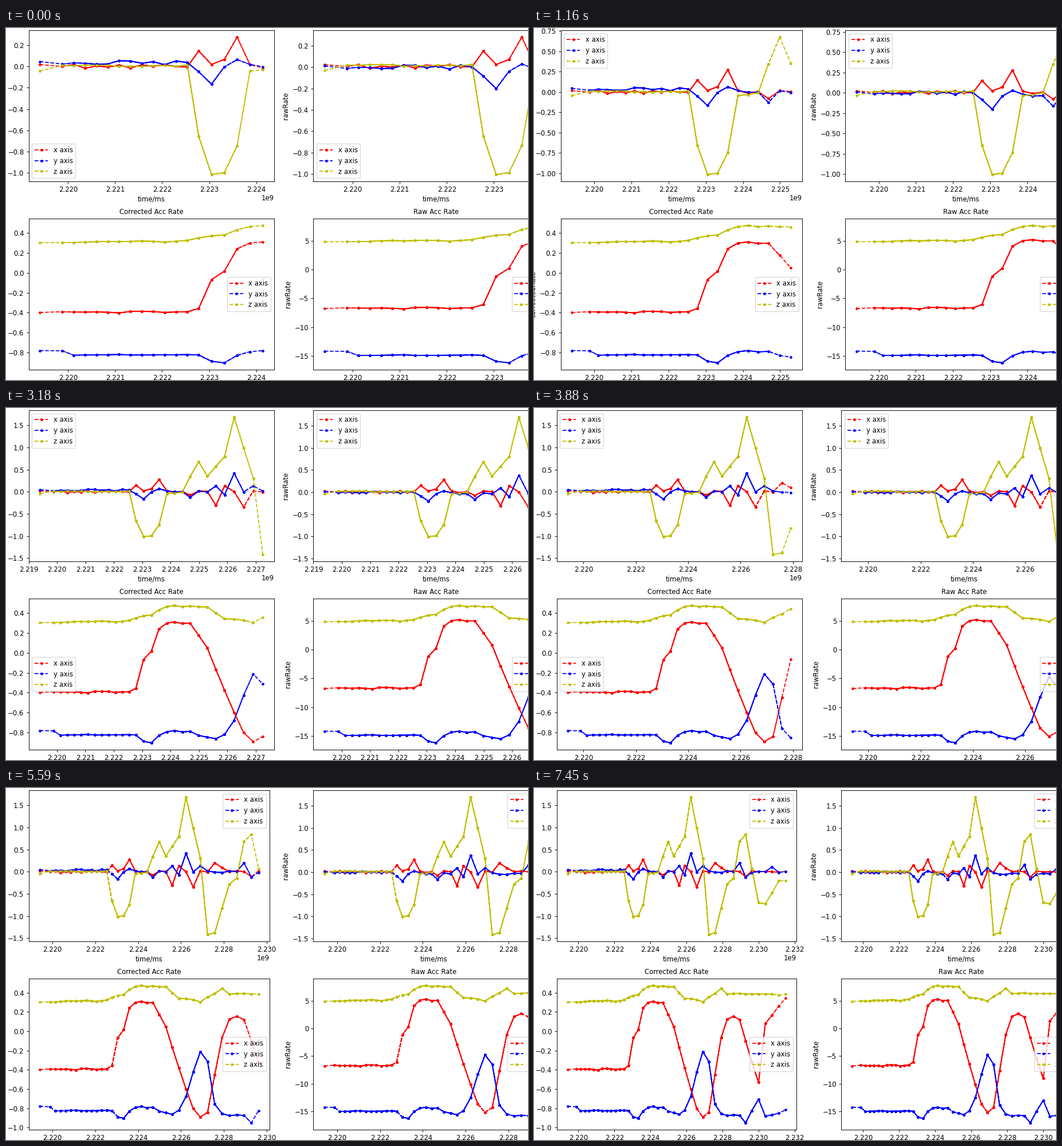
A matplotlib script that plays this animation: 911x615 px, repeating every 7540 ms.

```python
import numpy as np
import matplotlib.pyplot as plt
from matplotlib.animation import FuncAnimation
from matplotlib.artist import Artist

W, H, DPI = 911, 615, 84
LOOP, STEP = 7540, 20
COUNT, START = 41, 19   # all samples, samples on screen when the loop begins
WINDOW = 6              # samples redrawn with every update
AX_W, AX_H = 428, 264
COLORS = "rby"
LABELS = ["x axis", "y axis", "z axis"]
UPDATES = [300, 610, 930, 1160, 1540, 1850, 2230, 2480, 2860, 3180, 3560,
           3880, 4190, 4490, 4890, 5210, 5590, 5990, 6370, 6750, 7070, 7450]

rng = np.random.default_rng(4)
index = np.arange(COUNT)


def noise(size):
    return rng.uniform(-size, size, COUNT)


def curve(*keys):
    """Straight runs between a few (sample, value) points."""
    return np.interp(index, *zip(*keys))


def jolts(base, hits):
    """A steady reading with single sharp knocks."""
    out = base + noise(.02)
    for i, value in hits.items():
        out[i] = value
    return out


# Sample times, in millions of ms after 2.220e9
times = curve((0, -.6), (1, -.122), (13, 2.777), (20, 4.685), (24, 5.9),
              (29, 7.581), (35, 9.63), (40, 11.5))

# Turning rate: the swing is about z, the other axes only shake
spin = curve((0, -.04), (1, .01), (12, .01), (13, -.655), (14, -1.015),
             (15, -1), (16, -.755), (17, -.045), (19, 0), (21, .68),
             (22, .345), (24, .8), (25, 1.68), (27, .31), (28, -1.415),
             (29, -1.38), (31, -.285), (32, -.155), (33, .68), (34, .85),
             (36, -.7), (37, -.735), (39, -.21), (40, -.21))
gyro = [
    jolts(0, {13: .145, 15: .066, 16: .275, 20: -.08, 23: -.312, 24: .135,
              26: -.345, 29: .2, 30: .09, 34: -.115}),
    jolts(np.where(index < 13, .035, 0),
          {13: -.05, 14: -.166, 16: .064, 20: -.128, 23: .13, 24: -.07,
           25: .417, 27: .13, 33: .2, 34: -.12, 38: .11}),
    spin + noise(.012),
]

# Acceleration is gravity seen from the swinging sensor, so y follows x and z
acc_x = noise(.009) + curve(
    (0, -.395), (12, -.395), (13, -.35), (14, -.073), (15, .023), (16, .233),
    (17, .303), (20, .297), (22, .04), (26, -.807), (27, -.888), (28, -.848),
    (30, -.065), (31, .12), (32, .163), (33, .113), (36, -.533), (37, .075),
    (40, .343))
acc_z = noise(.007) + curve(
    (0, .305), (11, .315), (15, .38), (17, .47), (22, .462), (24, .347),
    (27, .31), (30, .437), (31, .39), (40, .378))
acc_y = -np.sqrt(.93 - acc_x ** 2 - acc_z ** 2)
acc_y[:2] += .045
acc_y[[15, 34]] = -.903, -.95
acc = [acc_x, acc_y, acc_z]

raw_gyro = [gyro[0] + .005, gyro[1] - .035, gyro[2] + .01]
raw_acc = [17 * acc_x, 16.6 * acc_y - 1.25, 16.5 * acc_z - .1]

# Row, column, series, title, y label
PANELS = [
    (0, 0, gyro, "Corrected Gyro Rate", "correctedRate"),
    (0, 1, raw_gyro, "Raw Gyro Rate", "rawRate"),
    (1, 0, acc, "Corrected Acc Rate", "correctedRate"),
    (1, 1, raw_acc, "Raw Acc Rate", "rawRate"),
]
fig = plt.figure(figsize=(W / DPI, H / DPI), dpi=DPI, facecolor="white")
axes = []
for row, col, _, title, ylabel in PANELS:
    ax = fig.add_axes([0, 0, 1, 1], label=title)
    ax.set_title(title, fontsize=10, pad=6.5)
    ax.set_xlabel("time/ms", labelpad=2.8)
    ax.set_ylabel(ylabel)
    ax.xaxis.OFFSETTEXTPAD = 1.5
    axes.append(ax)


def padded(low, high):
    pad = .05 * (high - low)
    return low - pad, high + pad


def snapped(limits):
    """Pull each limit onto a tick lying within a pixel of it."""
    near = (limits[1] - limits[0]) / AX_W
    return [round(v) if abs(v - round(v)) < near else v for v in limits]


def layout(n):
    """Left shift and width of the panels, fitted to their tick labels."""
    rates = padded(np.min(gyro[2][:n]), np.max(gyro[2][:n]))
    two_decimals = .2 < (rates[1] - rates[0]) / 9 <= .25
    shift = 7 if two_decimals else 0
    low, high = snapped(padded(times[0], times[n - 1]))
    span = high - low
    step = 1 if span <= 9 else 2
    last_gap = high % step / span * AX_W
    return shift, AX_W - shift - max(0, 13 - last_gap)


def legend_spot(row, col, state):
    if row == 0:
        if state < 2:
            return "lower left"
        return "upper left" if state < 13 else "upper right"
    return "center left" if col == 0 and 5 <= state < 16 else "center right"


def add_window(ax, series, end):
    part = slice(end - WINDOW, end)
    for values, color in zip(series, COLORS):
        ax.plot((2220 + times[part]) * 1e6, values[part], color + ".--")


def render(state):
    n = START + state
    shift, width = layout(n)
    for ax, (row, col, series, *_) in zip(axes, PANELS):
        for end in range(WINDOW if state == 0 else n, n + 1):
            add_window(ax, series, end)
        xlim = padded(times[0], times[n - 1])
        if row == 0:
            xlim = snapped(xlim)
        ax.set_xlim([(2220 + v) * 1e6 for v in xlim])
        seen = np.array(series)[:, :n]
        ax.set_ylim(padded(seen.min(), seen.max()))
        left, bottom = (39.6, 536.4)[col] + shift, (268, 597)[row]
        ax.set_position([left / W, 1 - bottom / H, width / W, AX_H / H])
        ax.legend(ax.lines[:3], LABELS, loc=legend_spot(row, col, state))
    fig.canvas.draw()
    return np.asarray(fig.canvas.buffer_rgba())[::-1].copy()


class Page(Artist):
    """Shows one rendered state of the whole figure."""

    pixels = None

    def draw(self, renderer):
        gc = renderer.new_gc()
        renderer.draw_image(gc, 0, 0, self.pixels)
        gc.restore()


pages = [render(state) for state in range(len(UPDATES) + 1)]
fig.clear()
page = Page()
page.pixels = pages[0]
fig.add_artist(page)


def show(i):
    now = i * STEP + STEP / 2
    page.pixels = pages[sum(t <= now for t in UPDATES)]
    page.stale = True
    return [page]


anim = FuncAnimation(fig, show, frames=LOOP // STEP, interval=STEP,
                     repeat=True, repeat_delay=0, cache_frame_data=False)
plt.show()
```
